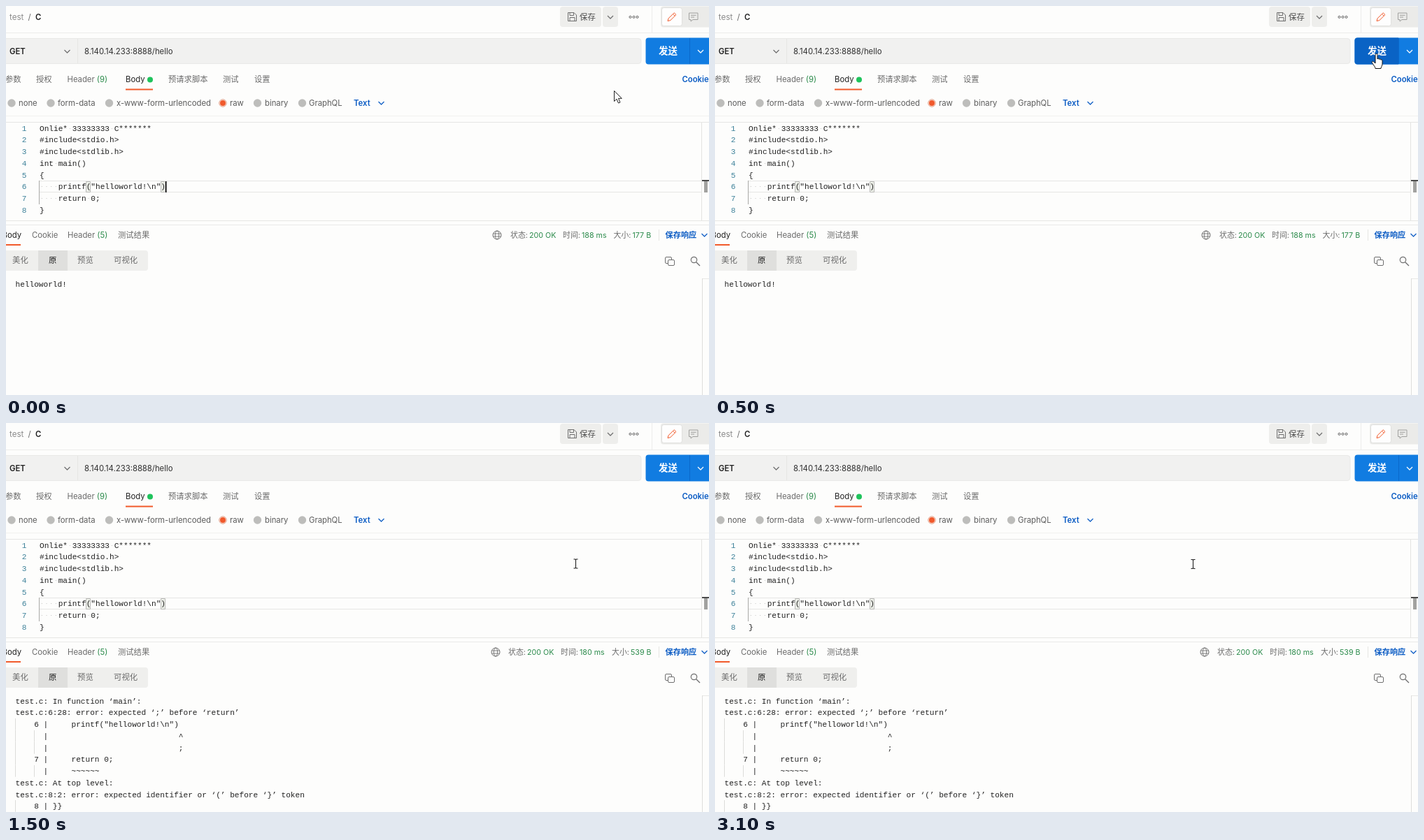
An HTML page with a canvas that plays this animation: 1005 by 557 pixels, repeating every 3.2 s.

```html
<!DOCTYPE html>
<html lang="zh-CN">
<head>
<meta charset="utf-8">
<title>API client</title>
<style>
html, body { margin: 0; width: 100%; height: 100%; overflow: hidden; background: #fdfdfc; }
canvas { display: block; width: 1005px; height: 557px; }
</style>
</head>
<body>
<canvas id="stage"></canvas>
<script>
const W = 1005, H = 557, LOOP = 3200, STEP = 100;
const canvas = document.getElementById('stage');
const ctx = canvas.getContext('2d');
const ratio = window.devicePixelRatio || 1;
canvas.width = W * ratio;
canvas.height = H * ratio;

const UI = 'Inter, "Noto Sans CJK SC", "Noto Sans CJK", sans-serif';
const MONO = '"Liberation Mono", "Noto Sans Mono", monospace';
const CODE_SIZE = 11.11, LINE = 16.75, COL = 6.667;
const C = {
  bg: '#fdfdfc', panel: '#f1f1f0', line: '#e6e6e4', ink: '#212121', gray: '#6b6b6b',
  icon: '#6f6f6f', orange: '#f15a2b', green: '#2a8a4a', link: '#0b5cc4', blue: '#117ce1'
};

const source = [
  'Onlie* 33333333 C*******',
  '#include<stdio.h>',
  '#include<stdlib.h>',
  'int main()',
  '{',
  '    printf("helloworld!\\n")',
  '    return 0;',
  '}'
];
const errors = [
  'test.c: In function ‘main’:',
  'test.c:6:28: error: expected ‘;’ before ‘return’',
  '    6 |     printf("helloworld!\\n")',
  '      |' + ' '.repeat(28) + '^',
  '      |' + ' '.repeat(28) + ';',
  '    7 |     return 0;',
  '      |     ~~~~~~',
  'test.c: At top level:',
  'test.c:8:2: error: expected identifier or ‘(’ before ‘}’ token',
  '    8 | }}'
];

function text(str, x, y, color = C.gray, size = 11.3, weight = 400, family = UI) {
  ctx.font = `${weight} ${size}px ${family}`;
  ctx.fillStyle = color;
  ctx.fillText(str, x, y);
  return x + ctx.measureText(str).width;
}

function code(str, x, y, color = C.ink) {
  text(str, x, y, color, CODE_SIZE, 400, MONO);
}

// code rows sit on whole pixels
const row = (top, i) => top + Math.floor(i * LINE);

function rect(x, y, w, h, color) {
  ctx.fillStyle = color;
  ctx.fillRect(x, y, w, h);
}

function round(x, y, w, h, r, fill, stroke) {
  ctx.beginPath();
  ctx.roundRect(x, y, w, h, r);
  paint(fill, stroke);
}

function circle(x, y, r, fill, stroke, width = 1) {
  ctx.beginPath();
  ctx.arc(x, y, r, 0, Math.PI * 2);
  paint(fill, stroke, width);
}

function paint(fill, stroke, width = 1) {
  if (fill) { ctx.fillStyle = fill; ctx.fill(); }
  if (stroke) { ctx.strokeStyle = stroke; ctx.lineWidth = width; ctx.stroke(); }
}

function draw(d, color, width = 1, x = 0, y = 0, fill) {
  ctx.save();
  ctx.translate(x, y);
  const p = new Path2D(d);
  if (fill) { ctx.fillStyle = fill; ctx.fill(p); }
  ctx.strokeStyle = color;
  ctx.lineWidth = width;
  ctx.lineJoin = 'round';
  ctx.stroke(p);
  ctx.restore();
}

function chevron(x, y, color) {
  draw('M-4 -2L0 2L4 -2', color, 1.2, x, y);
}

function toolbar() {
  text('test', 5, 20, '#8a8a8a', 11.6);
  text('/', 31.5, 20, '#6b6b6b', 11.6);
  text('C', 42, 20, C.ink, 11.3, 600);
  rect(0, 38, W, 1, '#ececea');

  round(792, 1, 59, 29, 4, '#eeeeec');
  round(853, 1, 22, 29, 4, '#eeeeec');
  draw('M.5 .5H9L12.5 4V12.5H.5ZM3 .5V4.5H8.5V.5M3 12.5V7.5H10V12.5', C.icon, 1, 803, 9);
  text('保存', 820, 19.5, '#4a4a4a', 11.4, 500);
  chevron(864, 16, C.icon);
  for (const x of [892.5, 897.5, 902.5]) circle(x, 15.8, 1.5, null, '#555');
  rect(923, 0, 1, 38, '#ededeb');

  round(936, 0.5, 75, 30, 4, '#ebebe9');
  round(937.5, 2.5, 29, 26, 3, '#fefefe', '#e0e0de');
  draw('M.5 12.5L1.5 8.8L9.7 .8L12.5 3.5L4.3 11.6ZM8 2.5L10.7 5.2', C.orange, 1, 945.5, 9);
  draw('M.5 .5H13V10H6L3 12.5V10H.5ZM3 3.8H10.5M3 6.5H8', '#a0a09e', 1, 976, 9.5);
}

function requestBar(state) {
  round(-4, 46.5, 912, 36, 4, C.panel, '#e9e9e7');
  rect(102, 47, 1, 35, C.line);
  text('GET', 5, 69, C.ink, 11.3, 600);
  chevron(87.5, 65, C.icon);
  text('8.140.14.233:8888/hello', 112, 68.5, '#303030');

  round(914.5, 45.5, 100, 38, 4, state.sending ? '#86bdf0' : C.blue);
  if (state.sending) {
    text('发送中...', 935.5, 69, '#fff', 13.3, 700);
    return;
  }
  if (state.hover) round(914.5, 45.5, 62.5, 38, [4, 0, 0, 4], '#0a63c5');
  rect(977, 46, 1, 37, '#0b69cb');
  text('发送', 933, 69, '#fff', 13.5, 700);
  chevron(993, 65, '#fff');
}

function counted(label, count, x, y) {
  text(count, text(label + ' ', x, y), y, C.green);
}

function requestTabs() {
  text('参数', -1, 109);
  text('授权', 43, 109);
  counted('Header', '(9)', 87.5, 109);
  text('Body', 171, 109, C.ink);
  circle(206, 105.5, 4, '#1fc35c');
  rect(171, 118.5, 39, 2, C.orange);
  text('预请求脚本', 232, 109);
  text('测试', 310, 109);
  text('设置', 355, 109);
  text('Cookie', 966.5, 109, C.link, 11.3, 600);

  const modes = [
    ['none', 8, 18], ['form-data', 64, 74], ['x-www-form-urlencoded', 147.5, 158],
    ['raw', 310, 320], ['binary', 359.5, 370], ['GraphQL', 423.5, 433]
  ];
  for (const [name, cx, x] of modes) {
    if (name === 'raw') {
      circle(cx, 139, 5.3, '#fbe3da', '#e4a48d');
      circle(cx, 139, 4, '#f0592c');
    } else circle(cx, 139, 5.7, '#bdbdbb');
    text(name, x, 143, '#5c5c5c');
  }
  text('Text', 497, 143, C.link, 11.3, 600);
  chevron(536.5, 139, C.link);
  rect(0, 157, W, 1, '#f1f1ef');
}

function editor(caret) {
  rect(0, 166, W, 1, C.line);
  rect(994, 167, 1, 140, '#e3e3e1');
  rect(48, 250, 947, 1, C.line);
  rect(48, 266, 947, 1, C.line);
  rect(47, 250, 1, 34, '#a9a9a7');
  for (const x of [114.5, 221.5]) {
    ctx.beginPath();
    ctx.rect(x, 251.5, 6, 15);
    paint('#eef1ea', '#b9b9b7');
  }
  source.forEach((str, i) => {
    const y = row(179, i);
    ctx.textAlign = 'right';
    code(String(i + 1), 29.5, y, '#3d8199');
    ctx.textAlign = 'left';
    code(str, 48, y);
    [...str].forEach((ch, col) => {
      if (ch === ' ') rect(48 + (col + 0.5) * COL - 0.5, y - 4, 1, 1, '#c4c4c2');
    });
  });
  if (caret) rect(228, 251, 1.5, 16, '#000');
  rect(995, 249, 10, 2, '#4b4b4b');
  rect(998, 251, 5, 16, '#a2a2a0');
  rect(0, 307, W, 1, C.line);
  rect(0, 313, W, 1, '#ebebe9');
}

function stats(done) {
  const [globe, a, b, c] = done ? [700, 718, 793, 866] : [702, 721, 796, 868.5];
  circle(globe, 328, 6, null, C.icon);
  ctx.beginPath();
  ctx.ellipse(globe, 328, 2.7, 6, 0, 0, Math.PI * 2);
  paint(null, C.icon, 0.9);
  draw('M-5.5 -2H5.5M-5.5 2H5.5', C.icon, 0.9, globe, 328);
  const pair = (label, value, x) => {
    text(label, x, 332, C.gray, 10.9);
    text(value, x + 27, 332, C.green, 10.7);
  };
  pair('状态:', '200 OK', a);
  pair('时间:', done ? '180 ms' : '188 ms', b);
  pair('大小:', done ? '539 B' : '177 B', c);
  rect(933, 320, 1, 16, C.line);
  text('保存响应', 942.5, 332, C.link, 11.2, 700);
  chevron(998.5, 328, C.link);
}

function response(done) {
  text('Body', -5.5, 332, C.ink);
  rect(0, 341, 21, 2, C.orange);
  text('Cookie', 37, 332);
  counted('Header', '(5)', 88, 332);
  text('测试结果', 160, 332);
  stats(done);

  round(-4, 350, 207, 29, 4, '#efefed');
  rect(46, 350, 42, 29, '#dfdfdd');
  text('美化', 9, 368, C.gray, 11.4);
  text('原', 61, 368, C.ink, 11.4, 500);
  text('预览', 102, 368, C.gray, 11.4);
  text('可视化', 154, 368, C.gray, 11.4);
  round(942.5, 359.5, 9, 9, 1.5, null, C.icon);
  round(946.5, 363.5, 9, 8, 1.5, C.bg, C.icon);
  circle(983.5, 363.5, 4.2, null, C.icon, 1.2);
  draw('M986.7 366.7L992 372', C.icon, 1.3);
  rect(995, 390, 10, 1, '#e8e8e6');
  rect(995, 390, 1, 167, '#dededc');

  (done ? errors : ['helloworld!']).forEach((str, i) => {
    const y = row(402, i);
    if (str[0] === ' ') rect(13, y - 12, 1, LINE, '#dcdcda');
    if (str.startsWith('      ')) rect(40, y - 12, 1, LINE, '#dcdcda');
    code(str, 13.5, y);
  });
}

function overlay(t) {
  rect(0, 314, W, 243, 'rgba(253,253,252,.8)');
  const reach = 320 * (t - 600) / 200;
  const glow = ctx.createLinearGradient(0, 0, reach, 0);
  glow.addColorStop(0, '#f26a3d');
  glow.addColorStop(0.35, '#f4794f');
  glow.addColorStop(1, 'rgba(250,200,180,0)');
  rect(0, 313, reach, 2.5, glow);
  text('发送请求中...', 463, 413, C.ink, 13, 700);
  round(455, 442, 92.5, 29, 4, '#eeeeec');
  text('取消', 490, 460.5, '#4a4a4a', 11.4, 500);
}

const shapes = {
  arrow: 'M.5 .5V15.5L4 12.2L6.5 18L9 17L6.5 11.3H11.3Z',
  hand: 'M5.5 1.5C5.5 0 8.5 0 8.5 1.5V8C9 6.8 11 7 11 8.4C11.6 7.4 13.3 7.8 13.3 9.2' +
    'C14 8.4 15.5 9 15.5 10.3V15C15.5 18 13.5 19 13.5 21.5H5.5C5.5 19 3 17 1 13.5' +
    'C-.2 11.5 2 10.5 3.3 12L5.5 14Z',
  beam: 'M-3 -6.5H-1L0 -5.8L1 -6.5H3M0 -5.8V5.8M-3 6.5H-1L0 5.8L1 6.5H3'
};

// time, x, y of the pointer hot spot
const path = [
  [0, 869, 121], [100, 869, 121], [400, 945, 68], [600, 945, 68],
  [800, 814.5, 201.5], [2000, 814.5, 201.5], [2400, 683.5, 202], [LOOP, 683.5, 202]
];

function pointer(t) {
  const i = path.findIndex(p => p[0] > t);
  const [t0, x0, y0] = path[i - 1], [t1, x1, y1] = path[i];
  const k = (t - t0) / (t1 - t0), e = k * k * (3 - 2 * k);
  return [x0 + (x1 - x0) * e, y0 + (y1 - y0) * e];
}

function cursor(x, y, hover) {
  if (hover) draw(shapes.hand, '#111', 1, x - 6.5, y, '#fff');
  else if (y > 166) draw(shapes.beam, '#222', 1.1, x, y);
  else draw(shapes.arrow, '#222', 1, x, y, '#fff');
}

function render(now) {
  const t = Math.floor(now % LOOP / STEP) * STEP;
  const [x, y] = pointer(t);
  const sending = t >= 700 && t < 900;
  const hover = !sending && x > 915 && y > 46 && y < 83;

  ctx.setTransform(ratio, 0, 0, ratio, 0, 0);
  rect(0, 0, W, H, C.bg);
  toolbar();
  requestBar({ sending, hover });
  requestTabs();
  editor(t < 300);
  response(t >= 900);
  if (sending) overlay(t);
  cursor(x, y, hover);
}

const start = performance.now();
function tick() {
  render(performance.now() - start);
  requestAnimationFrame(tick);
}
tick();
</script>
</body>
</html>
```
